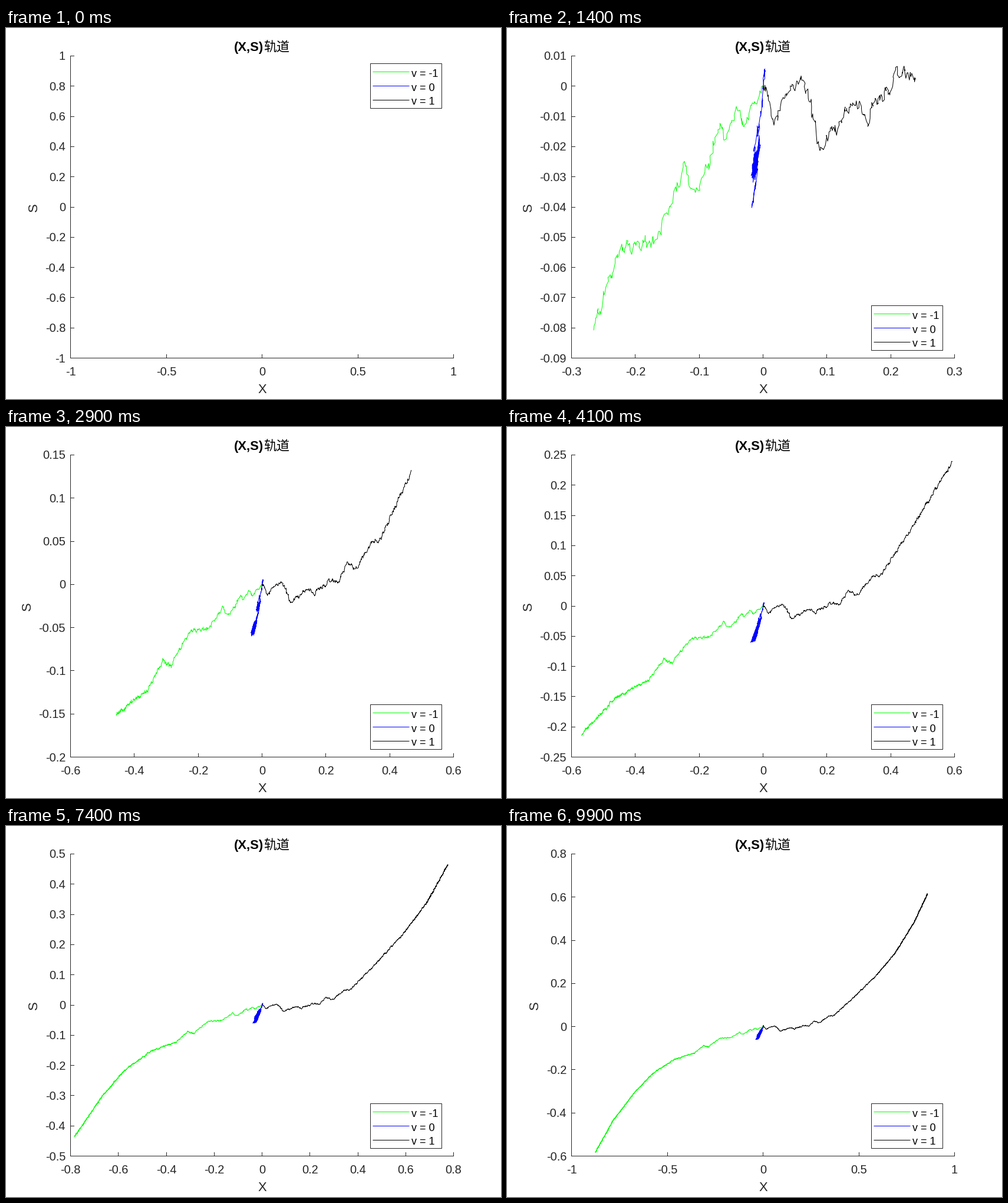
Write a matplotlib script that moves like this. It is 840 by 630 pixels and loops after 10 s.

```python
import matplotlib.pyplot as plt
import numpy as np
from matplotlib.animation import FuncAnimation
from matplotlib.patches import Rectangle

W, H, DPI = 840, 630, 100
PX = 72 / DPI
FRAMES, SUB = 100, 15
LEFT, RIGHT, TOP, BOTTOM = 109.5, 759.5, 47.5, 560.5
INK = (0.15, 0.15, 0.15)
COLORS = ("lime", "blue", "black")
plt.rcParams["path.simplify"] = False
rng = np.random.default_rng(7)

# Main turns of each orbit: frame, then X and S in thousandths.
GREEN = [
    (0, 0, 0), (1.4, -30, -12), (1.9, -40, -9), (2.8, -60, -17),
    (3.1, -66, -12), (4.8, -102, -37), (5.7, -123, -28), (7.7, -167, -51),
    (11.5, -225, -55), (15, -284, -94), (17, -310, -88), (20, -358, -122),
    (29.5, -462, -152), (41, -569, -212), (54, -666, -300), (74, -784, -437),
    (99, -875, -582),
]
BLACK = [
    (0, 0, 0), (.9, 16, -10), (3.5, 63, 3), (5, 89, -21), (8, 143, -5),
    (9, 162, -11), (12, 207, 5), (14, 241, 2), (15.5, 267, 25),
    (17.3, 297, 19), (20, 342, 48), (22, 370, 52), (29, 468, 131),
    (41, 593, 238), (54, 687, 337), (77, 790, 485), (99, 858, 614),
]
BLUE = [
    (0, 0, 0), (.5, 3, 5), (1.8, -6, -12), (2.6, -13, -20), (4, -16, -28),
    (8, -12, -25), (12, -8, -24), (17, -22, -50), (30, -30, -52),
    (48, -9, -24), (62, -26, -38), (76, -9, -14), (99, -20, -36),
]


def wander(n, std, memory):
    """Mean-reverting noise with the given spread."""
    kicks = rng.normal(size=n).clip(-2, 2) * std * np.sqrt(1 - memory ** 2)
    out = np.zeros(n)
    for i in range(1, n):
        out[i] = memory * out[i - 1] + kicks[i]
    return out


def orbit(keys, shared=(0, 0)):
    """Noisy path through the turns; `shared` noise moves X and S together."""
    frame, x, s = np.array(keys).T
    t = np.arange(FRAMES * SUB) / SUB
    n = len(t)
    both = wander(n, 1, 0.3) * np.clip(t / 15, 0.3, 1)
    x = np.interp(t, frame, x / 1000) + wander(n, .0008, 0) + shared[0] * both
    s = np.interp(t, frame, s / 1000) + wander(n, .0016, .7) + shared[1] * both
    return x, s


ORBITS = [orbit(GREEN), orbit(BLUE, (.003, .004)), orbit(BLACK)]


def ticks(lo, hi, most):
    """Finest 1-2-5 ticks covering [lo, hi] in at most `most` intervals."""
    for e in range(-4, 2):
        for m in (1, 2, 5):
            step = m * 10.0 ** e
            a, b = np.floor(lo / step), np.ceil(hi / step)
            if b - a <= most:
                return np.arange(a, b + 1) * step


def label(v):
    return f"{round(v, 6) + 0.0:g}"


def text_width(s, size):
    em = {"-": 0.333, ".": 0.278}
    return size * sum(em.get(c, 0.556) for c in s)


fig = plt.figure(figsize=(W / DPI, H / DPI), dpi=DPI, facecolor="white")
ax = fig.add_axes([0, 0, 1, 1])
ax.set(xlim=(0, W), ylim=(H, 0))
ax.axis("off")


def line(x=(), y=(), color=INK, **kw):
    return ax.plot(x, y, color=color, lw=PX, snap=False, **kw)[0]


def text(x, y, s="", size=20, font="Liberation Sans", color=INK, **kw):
    kw.setdefault("va", "baseline")
    return ax.text(x, y, s, fontsize=size * PX, family=font, color=color, **kw)


curves = [line(color=c, zorder=3) for c in COLORS]
line([LEFT, LEFT, RIGHT], [TOP, BOTTOM, BOTTOM], zorder=2)
marks = line(zorder=2)
x_labels = [text(0, 590, ha="center") for _ in range(11)]
y_labels = [text(101, 0, ha="right") for _ in range(11)]

text(387, 39, "(X,S)", 22, color="black", weight="bold")
text(437, 39, "轨道", 22, "Noto Sans CJK JP", "black")
text(435, 620, "X", 22, ha="center")
s_label = text(47, 304.5, "S", 22, ha="center", va="center", rotation=90)

box = Rectangle((618.5, 60.5), 121, 76, fc="white", ec=INK, lw=PX,
                snap=False, zorder=4)
ax.add_patch(box)
rows = [(line(color=c, zorder=5),
         text(688, 0, f"v = {v}", 18, color="black", zorder=5))
        for c, v in zip(COLORS, (-1, 0, 1))]


def place_legend(dy):
    box.set_y(60.5 + dy)
    for i, (key, name) in enumerate(rows):
        y = 74.5 + 24 * i + dy
        key.set_data([623, 684], [y, y])
        name.set_y(83 + 23.7 * i + dy)


def place_ticks(xt, yt, to_x, to_y):
    px, py = [], []
    for v in xt:
        x = np.floor(to_x(v)) + 0.5
        px += [x, x, np.nan]
        py += [BOTTOM, BOTTOM - 6, np.nan]
    for v in yt:
        y = np.floor(to_y(v)) + 0.5
        px += [LEFT, LEFT + 6, np.nan]
        py += [y, y, np.nan]
    marks.set_data(px, py)
    for labels, values in ((x_labels, xt), (y_labels, yt)):
        for i, item in enumerate(labels):
            item.set_text(label(values[i]) if i < len(values) else "")
    for item, v in zip(x_labels, xt):
        item.set_x(to_x(v))
    for item, v in zip(y_labels, yt):
        item.set_y(to_y(v) + 7)
    widest = max(text_width(label(v), 20) for v in yt)
    s_label.set_x(101 - widest - 19)


def draw(n):
    parts = [(x[:n * SUB], s[:n * SUB]) for x, s in ORBITS]
    if n == 0:
        xt, yt = np.linspace(-1, 1, 5), np.linspace(-1, 1, 11)
    else:
        all_x, all_s = (np.concatenate(p) for p in zip(*parts))
        xt = ticks(all_x.min(), all_x.max(), 8)
        yt = ticks(all_s.min(), all_s.max(), 10)

    def to_x(v):
        return LEFT + (v - xt[0]) / (xt[-1] - xt[0]) * (RIGHT - LEFT)

    def to_y(v):
        return BOTTOM - (v - yt[0]) / (yt[-1] - yt[0]) * (BOTTOM - TOP)

    for curve, (x, s) in zip(curves, parts):
        curve.set_data(to_x(x), to_y(s))
    place_ticks(xt, yt, to_x, to_y)
    place_legend(0 if n < 3 else 411)


anim = FuncAnimation(fig, draw, frames=FRAMES, interval=100, repeat=True,
                     repeat_delay=0, blit=False)
plt.show()
```
